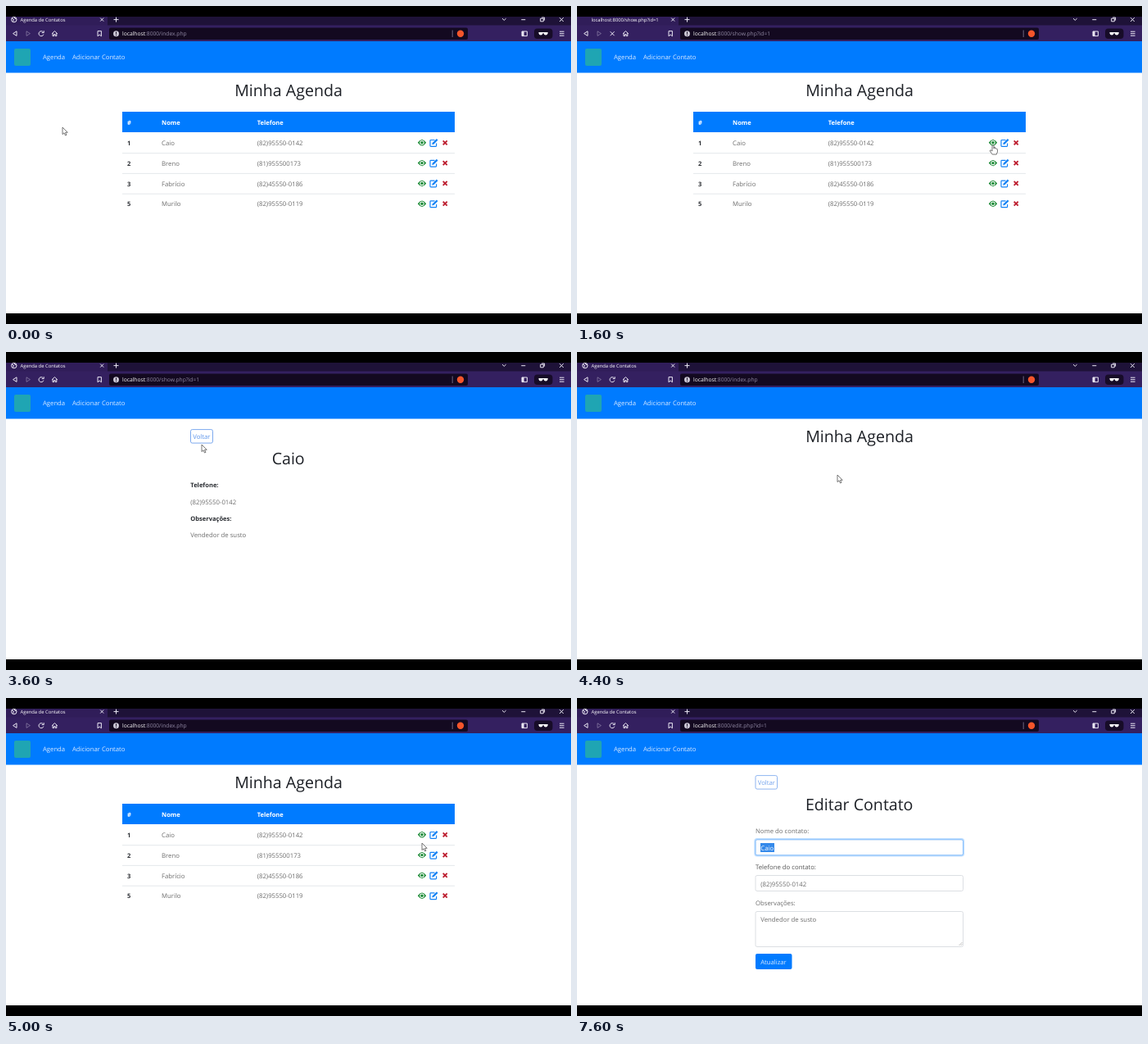
An HTML page for the animation above (8 s loop, 690x388 px).

```html
<!DOCTYPE html>
<html lang="pt-BR">
<head>
<meta charset="utf-8">
<title>Agenda de Contatos</title>
<style>
  html, body { margin: 0; width: 100%; height: 100%; overflow: hidden; background: #000; }
  svg { display: block; width: 690px; height: 388px; }
  text { font: 7.75px "Open Sans", "Noto Sans", sans-serif; fill: #6c6c6c; text-rendering: geometricPrecision; white-space: pre; }
  .h1 { font-size: 19.6px; font-weight: 500; fill: #1d2026; text-anchor: middle; }
  .strong { font-size: 7.55px; font-weight: 700; fill: #2b2e33; }
  .white { fill: #fff; }
  .nav { font-size: 7.7px; font-weight: 500; fill: #dcebff; }
  .tab { font-size: 5.85px; font-weight: 500; fill: #fff; }
  .url { font-size: 6.7px; fill: #938ba6; }
  .line { fill: none; stroke: #e9e6f2; stroke-width: 1; }
  .field { fill: #fff; stroke: #d3d7dc; stroke-width: .8; }
  .back rect { fill: #fff; stroke: #5b93ea; stroke-width: .8; }
  .back text { fill: #5b93ea; }
  .back.hover rect { fill: #007bff; stroke: #007bff; }
  .back.hover text { fill: #fff; }
</style>
</head>
<body>
<svg viewBox="0 0 690 388">
  <defs>
    <g id="eye">
      <path d="M-5.2 0Q0-7.4 5.2 0Q0 7.4-5.2 0Z" fill="#1b8a35"/>
      <circle r="2.7" fill="#fff"/><circle r="1.7" fill="#1b8a35"/>
    </g>
    <g id="pen" fill="none" stroke="#1482f5">
      <path d="M1-3.3H-3.7Q-4.5-3.3-4.5-2.5V3.7Q-4.5 4.5-3.7 4.5H2.3Q3.1 4.5 3.1 3.7V.8" stroke-width="1.2"/>
      <path d="M-1.2 1.3L4.2-4" stroke-width="2.3"/>
      <path d="M-2.3 2.3L-1.9.4L-.4 1.9Z" fill="#1482f5" stroke="none"/>
    </g>
    <path id="cross" d="M-2.5-2.5L2.5 2.5M2.5-2.5L-2.5 2.5" stroke="#bd1f30" stroke-width="1.9"/>
  </defs>

  <rect width="690" height="388"/>
  <rect y="13" width="690" height="11" fill="#1e1238"/>
  <rect y="13" width="124" height="11" fill="#301d59"/>
  <rect y="23.5" width="690" height="20" fill="#342060"/>

  <g id="globe" class="line" stroke-width=".8">
    <circle cx="9.8" cy="16.6" r="3.2"/>
    <path d="M7 15.2L9.4 16.2L8.8 18.8M10 13.5L11 15.4L12.8 16"/>
  </g>
  <text id="tab" class="tab" x="17.5" y="18.8"></text>
  <path class="line" d="M115.2 14.6l4 4m0-4l-4 4M131.5 16.6h6m-3-3v6"/>
  <path class="line" d="M606 15.2l2.3 2.2l2.3-2.2M629.3 16.7h5M676 14.2l4.8 4.8m0-4.8l-4.8 4.8"/>
  <path class="line" d="M652.7 15.2h3.6v3.6h-3.6zM654.2 14h3.4v3.6" stroke-width=".8"/>

  <path class="line" d="M13 30.8v5.6l-4.4-2.8z"/>
  <path class="line" d="M25 30.8v5.6l4.4-2.8z" opacity=".35"/>
  <path id="reload" class="line" d="M45.5 32A3 3 0 1 0 45.9 34.6M46.2 30.2V32.6H43.8" stroke-width="1.1"/>
  <path id="stop" class="line" d="M40.6 31.2l5 5m0-5l-5 5"/>
  <path class="line" d="M56 33.8l3.4-3.2l3.4 3.2M57 33v3.6h1.6v-2h1.6v2h1.6V33"/>
  <path class="line" d="M112 30.6h4.4v6.2l-2.2-1.8l-2.2 1.8z" stroke-width=".9"/>
  <rect x="126" y="26.5" width="438" height="14.5" rx="2" fill="#130920"/>
  <circle cx="134.5" cy="33.7" r="3.5" fill="#c9c5d3"/>
  <path d="M134.5 31.6v2.6m0 .8v1" stroke="#130920"/>
  <text class="url" x="142" y="36.2"><tspan class="white">localhost</tspan><tspan id="path"></tspan></text>
  <path d="M545.2 29.5v8.5" stroke="#77708a" stroke-width=".9"/>
  <circle cx="555" cy="33.8" r="4.2" fill="#f4552b"/>
  <path class="line" d="M630 31h6.4v5.6H630z"/>
  <path d="M630 31h2.6v5.6H630z" fill="#e9e6f2"/>
  <rect x="645" y="27.5" width="22.5" height="12.5" rx="4" fill="#170c28"/>
  <path d="M650.5 32h11.2v1.3q-.5 2.2-2.6 2.2t-2.5-2.2h-1q-.4 2.2-2.5 2.2t-2.6-2.2z" fill="#fff"/>
  <path class="line" d="M676 31.2h5.6m-5.6 2.5h5.6m-5.6 2.5h5.6"/>

  <rect y="43" width="690" height="332" fill="#fff"/>
  <rect y="43" width="690" height="38.5" fill="#007bff"/>
  <rect x="10" y="52" width="20" height="21" rx="2" fill="#1fa5b3"/>
  <text class="nav" x="45" y="65.4">Agenda</text>
  <text class="nav" x="81" y="65.4">Adicionar Contato</text>

  <g id="list">
    <text class="h1" x="345" y="109.8">Minha Agenda</text>
    <g id="table">
      <rect x="142" y="129" width="406" height="25" fill="#007bff"/>
      <text class="strong white" x="148" y="144.8">#</text>
      <text class="strong white" x="190" y="144.8">Nome</text>
      <text class="strong white" x="306.7" y="144.8">Telefone</text>
    </g>
  </g>

  <g id="show">
    <g class="back" id="showBack">
      <rect x="225.5" y="94.6" width="27" height="16.5" rx="2"/>
      <text x="228.2" y="106.1">Voltar</text>
    </g>
    <text class="h1" x="344.7" y="137">Caio</text>
    <text class="strong" x="225.3" y="165.4">Telefone:</text>
    <text x="225.3" y="186">(82)95550-0142</text>
    <text class="strong" x="225.3" y="206.2">Observações:</text>
    <text x="225.3" y="226.4">Vendedor de susto</text>
  </g>

  <g id="edit">
    <g class="back" opacity=".85">
      <rect x="218" y="94.6" width="26.5" height="16.5" rx="2"/>
      <text x="220.7" y="106.1">Voltar</text>
    </g>
    <text class="h1" x="344.7" y="137">Editar Contato</text>
    <text x="218" y="165.4">Nome do contato:</text>
    <text x="218" y="209.2" style="fill:#555">Telefone do contato:</text>
    <text x="218" y="253">Observações:</text>
    <rect class="field" x="218" y="172.8" width="253.5" height="19" rx="2"/>
    <g id="focus" fill="none">
      <rect x="217.2" y="172" width="255.1" height="20.6" rx="2.8" stroke="#bfdeff" stroke-width="1.8"/>
      <rect x="218" y="172.8" width="253.5" height="19" rx="2" stroke="#80bdff" stroke-width=".9"/>
    </g>
    <rect id="mark" x="224" y="177" width="17" height="11" fill="#3489ea"/>
    <text id="name" x="224.3" y="185.8">Caio</text>
    <path id="caret" d="M227 177.5v10" stroke="#333" stroke-width=".7"/>
    <rect class="field" x="218" y="216.5" width="253.5" height="19" rx="2"/>
    <text x="224.3" y="229.6">(82)95550-0142</text>
    <rect class="field" x="218" y="260.5" width="253.5" height="43" rx="2"/>
    <text x="224.3" y="272.8">Vendedor de susto</text>
    <path d="M466.5 302l4-4m-1.8 4l1.8-1.8" stroke="#999" stroke-width=".6"/>
    <rect x="218" y="312" width="44.5" height="19" rx="2" fill="#007bff"/>
    <text class="nav white" x="224.2" y="324.5">Atualizar</text>
  </g>

  <g id="cursor" fill="#fff" stroke="#555" stroke-width=".8" stroke-linejoin="round">
    <path id="arrow" d="M0 0V8.6L2 6.8L3.5 10L4.9 9.4L3.5 6.3H6.2Z"/>
    <path id="hand" d="M-1 .8Q0-.6 1 .8V4.2Q2-.0 2.8 4.4Q3.6 3.4 4.2 4.8Q5.4 4.2 5.5 5.8V8.2L4.3 11.4H-.8L-3.6 7.4Q-3.8 5.8-2.4 6.3L-1 7.4Z"/>
    <path id="beam" d="M-1.6-4.2H1.6M0-4.2V4.2M-1.6 4.2H1.6" fill="none"/>
  </g>
</svg>
<script>
const LOOP = 8000, STEP = 100;
const $ = id => document.getElementById(id);
const show = (id, on) => { $(id).style.display = on ? '' : 'none'; };

const people = [
  [1, 'Caio', '(82)95550-0142'],
  [2, 'Breno', '(81)955500173'],
  [3, 'Fabrício', '(82)45550-0186'],
  [5, 'Murilo', '(82)95550-0119']
];
$('table').innerHTML += people.map(([id, name, phone], i) => {
  const y = 167 + i * 24.8;
  const icon = (ref, x) => `<use href="#${ref}" x="${x}" y="${y - .2}"/>`;
  return `<text class="strong" x="148" y="${y + 2.9}">${id}</text>
    <text x="190" y="${y + 2.9}">${name}</text>
    <text x="306.7" y="${y + 2.9}">${phone}</text>
    ${icon('eye', 508)}${icon('pen', 522.5)}${icon('cross', 536.2)}
    ${i < 3 ? `<path d="M142 ${y + 12.6}h406" stroke="#dee2e6" stroke-width=".8"/>` : ''}`;
}).join('');

// time, page, address, loading
const scenes = [
  [0, 'list', 'index.php', false],
  [1500, 'list', 'show.php?id=1', true],
  [1800, 'show', 'show.php?id=1', false],
  [3900, 'list', 'index.php', false],
  [5700, 'list', 'edit.php?id=1', true],
  [5900, 'edit', 'edit.php?id=1', false]
];

// time, x, y
const moves = [
  [0, 69, 148], [300, 190, 188], [500, 320, 202], [700, 450, 184], [900, 506, 171],
  [1100, 508, 169.5], [2900, 508, 170], [3200, 420, 193], [3400, 310, 160],
  [3600, 239, 113], [3800, 238, 106], [4100, 238, 106], [4400, 318, 150],
  [4700, 436, 184], [5000, 508, 177], [5400, 521, 168], [5800, 521, 168],
  [6100, 225.5, 164], [6400, 230, 184.3]
];

// time, pointer shape
const shapes = [
  [0, 'arrow'], [1000, 'hand'], [2200, 'arrow'], [3700, 'hand'], [4200, 'arrow'],
  [5300, 'hand'], [5900, 'arrow'], [6400, 'beam'], [7600, '']
];

const current = (table, t) => table.filter(row => row[0] <= t).pop();
const fade = (t, from, to) => {
  const p = Math.min(1, Math.max(0, (t - from) / (to - from)));
  return p * p * (3 - 2 * p);
};
const pointAt = t => {
  const i = moves.findIndex(m => m[0] > t);
  if (i < 0) return moves[moves.length - 1].slice(1);
  const [a, b] = [moves[i - 1], moves[i]];
  const p = (t - a[0]) / (b[0] - a[0]);
  return [1, 2].map(k => a[k] + (b[k] - a[k]) * p);
};

function draw(t) {
  const [, page, address, loading] = current(scenes, t);
  for (const id of ['list', 'show', 'edit']) show(id, id === page);
  $('path').textContent = ':8000/' + address;
  $('tab').textContent = loading ? 'localhost:8000/' + address : 'Agenda de Contatos';
  show('globe', !loading);
  show('reload', !loading);
  show('stop', loading);

  $('table').style.opacity = t < 3900 ? 1 : fade(t, 4500, 5000);
  $('show').style.opacity = fade(t, 2100, 2800);
  $('showBack').classList.toggle('hover', t >= 3700);

  const selected = t >= 7400;
  show('focus', t >= 6600);
  show('caret', t >= 6600 && t < 7200);
  show('mark', selected);
  $('name').style.fill = selected ? '#fff' : '';

  const shape = current(shapes, t)[1];
  for (const id of ['arrow', 'hand', 'beam']) show(id, id === shape);
  $('cursor').setAttribute('transform', `translate(${pointAt(t)})`);
}

const start = performance.now();
function tick() {
  const t = (performance.now() - start) % LOOP;
  draw(Math.floor(t / STEP) * STEP);
  requestAnimationFrame(tick);
}
tick();
</script>
</body>
</html>
```
